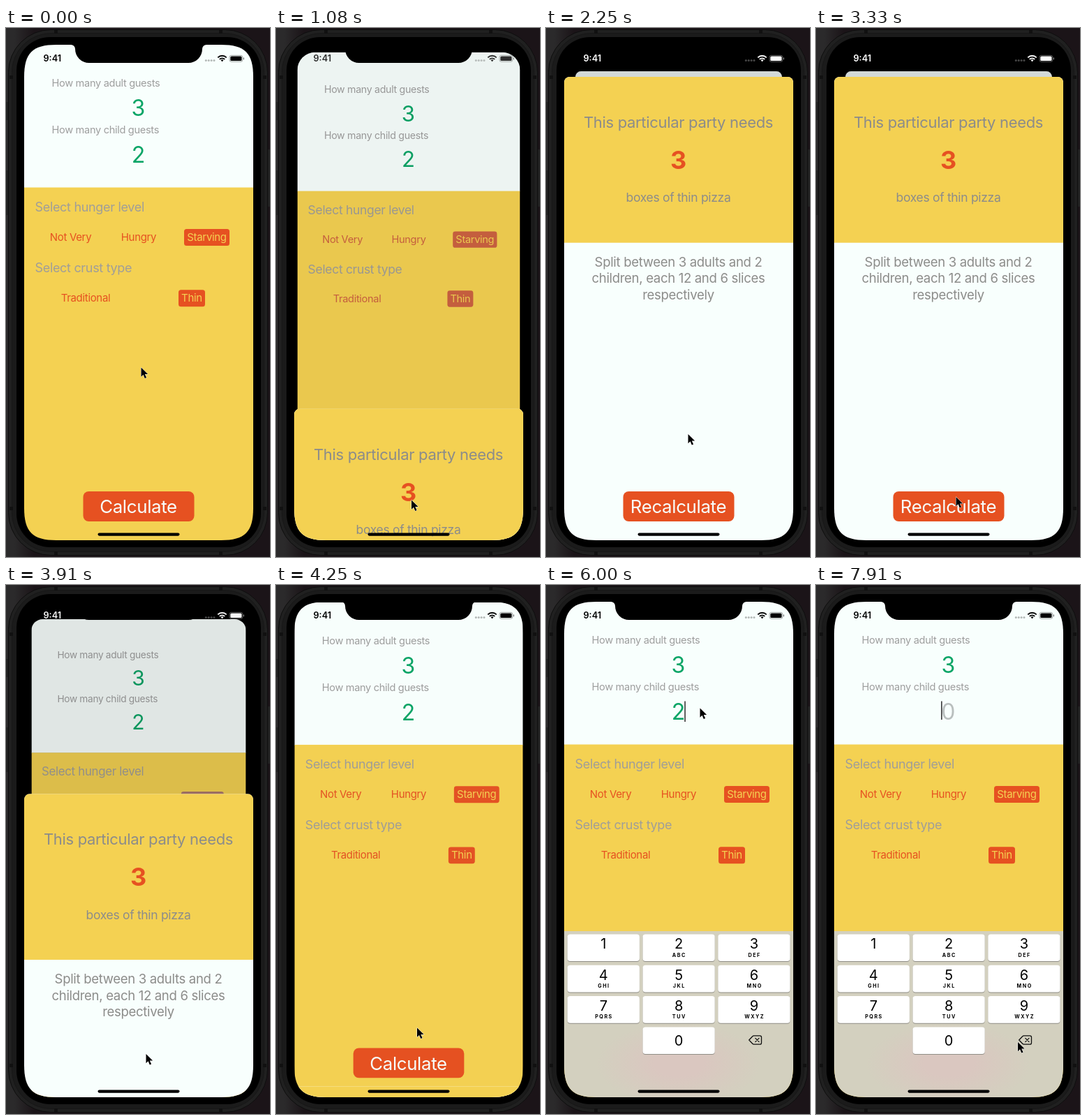
An HTML page for the animation above (8000 ms loop, 378 px wide and 758 px high).

```html
<!DOCTYPE html>
<html lang="en">
<head>
<meta charset="utf-8">
<title>Pizza party calculator</title>
<style>
  html, body { margin: 0; width: 100%; height: 100%; overflow: hidden; }
  body { background: linear-gradient(90deg, #2b2a2b 12px, #1b1418 40px); }
  svg { display: block; width: 378px; height: 758px; font-family: Inter, sans-serif; letter-spacing: -.02em; }
  .mid { text-anchor: middle; }
  .label { font-size: 14.6px; fill: #9e9e9e; }
  .head { font-size: 18px; fill: #a09e98; }
  .count { font-size: 32px; fill: #0aa566; }
  .option { font-size: 15px; fill: var(--tint); }
  .picked { font-size: 15px; fill: #f4d152; }
  .chip { fill: var(--tint); }
  .button { fill: #e65121; }
  .title { font-size: 25.8px; fill: #f8fffd; }
  .info { fill: #8c8c8a; }
  .digit { font-size: 20px; fill: #000; letter-spacing: 0; }
  .letters { font-size: 7.2px; font-weight: 700; fill: #000; letter-spacing: 1.5px; }
</style>
</head>
<body>
<svg viewBox="0 0 378 758">
  <defs>
    <clipPath id="screen">
      <path d="M26 70C26 36 38 24 72 24H308C342 24 354 36 354 70V688C354 722 342 734 308 734H72C38 734 26 722 26 688z"/>
    </clipPath>
    <clipPath id="cardShape"><rect id="cardArea" x="26" y="24" width="328" height="780"/></clipPath>
    <clipPath id="sheetShape"><rect x="26" y="70" width="328" height="700" rx="8"/></clipPath>
    <clipPath id="boardShape"><rect id="boardArea" x="26" width="328" height="238"/></clipPath>
    <radialGradient id="glow">
      <stop offset=".3" stop-color="#dac7c0"/>
      <stop offset="1" stop-color="#dac7c0" stop-opacity="0"/>
    </radialGradient>
  </defs>

  <!-- device -->
  <g fill="#222">
    <rect x="0" y="106" width="5" height="26"/>
    <rect x="0" y="204" width="5" height="64"/>
    <rect x="374" y="174" width="4" height="82"/>
  </g>
  <rect x="3.5" y="2.5" width="371" height="753" rx="61" fill="#202020" stroke="#0e0e0e"/>
  <rect x="8.5" y="7.5" width="361" height="743" rx="56" fill="#1b1b1b" stroke="#171717"/>
  <g fill="#111">
    <rect x="69" y="3" width="5" height="5"/><rect x="305" y="3" width="5" height="5"/>
    <rect x="69" y="750" width="5" height="5"/><rect x="305" y="750" width="5" height="5"/>
    <rect x="5" y="68" width="5" height="5"/><rect x="368" y="68" width="5" height="5"/>
    <rect x="5" y="686" width="5" height="5"/><rect x="368" y="686" width="5" height="5"/>
  </g>
  <rect x="15" y="13" width="350" height="731" rx="48"/>

  <g clip-path="url(#screen)">
    <g id="card"><g clip-path="url(#cardShape)">
      <rect x="26" y="24" width="328" height="205" fill="#f8fffd"/>
      <rect x="26" y="228.5" width="328" height="530" fill="#f4d152"/>
      <text class="label" x="65.5" y="84">How many adult guests</text>
      <text class="count mid" x="189.3" y="126">3</text>
      <text class="label" x="65.5" y="151.3">How many child guests</text>
      <text class="count mid" id="child" x="189.3" y="193.3">2</text>
      <rect id="caret" y="166.5" width="1.7" height="29.5" fill="#444"/>
      <text class="head" x="41.5" y="263">Select hunger level</text>
      <text class="option mid" x="92.5" y="305.2">Not Very</text>
      <text class="option mid" x="190" y="305.2">Hungry</text>
      <rect class="chip" x="255" y="288" width="65" height="24" rx="3.5"/>
      <text class="picked mid" x="287.5" y="305.2">Starving</text>
      <text class="head" x="41.5" y="350.3">Select crust type</text>
      <text class="option mid" x="114" y="392.3">Traditional</text>
      <rect class="chip" x="247" y="375.3" width="38" height="24" rx="3.5"/>
      <text class="picked mid" x="266" y="392.3">Thin</text>
      <rect class="button" x="110.5" y="664" width="159" height="43" rx="8"/>
      <text class="title mid" x="189.5" y="695.3">Calculate</text>
      <rect id="dim" x="26" y="24" width="328" height="735"/>
    </g></g>

    <g id="sheet"><g clip-path="url(#sheetShape)">
      <rect x="26" y="70" width="328" height="700" fill="#f8fffd"/>
      <rect x="26" y="70" width="328" height="237.7" fill="#f4d152"/>
      <g class="info mid">
        <text x="189.5" y="143" font-size="22">This particular party needs</text>
        <text x="189.5" y="249.3" font-size="17.5">boxes of thin pizza</text>
        <g font-size="18.55">
          <text x="189.5" y="341.5">Split between 3 adults and 2</text>
          <text x="189.5" y="365.3">children, each 12 and 6 slices</text>
          <text x="189.5" y="389">respectively</text>
        </g>
      </g>
      <text class="mid" x="189.5" y="202" font-size="36" font-weight="700" fill="#e65121">3</text>
      <rect class="button" x="110.5" y="664" width="159" height="43" rx="8"/>
      <text class="title mid" x="189.5" y="695.3">Recalculate</text>
    </g></g>

    <g clip-path="url(#boardShape)">
      <rect x="26" y="490" width="328" height="250" fill="#d3d0bf"/>
      <ellipse cx="190" cy="686" rx="118" ry="60" fill="url(#glow)"/>
    </g>
    <g id="keys">
      <g id="erase" fill="none" stroke="#111" stroke-width="1.3" stroke-linejoin="round" stroke-linecap="round">
        <path d="M290.7 652l5-5.3q.8-.9 2-.9h8.6q2.2 0 2.2 2.2v8q0 2.2-2.2 2.2h-8.6q-1.2 0-2-.9z"/>
        <path id="cross" d="M299.8 649.4l5.2 5.2m0-5.2l-5.2 5.2"/>
      </g>
    </g>

    <path d="M93 24a6 6 0 0 1 6 6a20 20 0 0 0 20 20h142a20 20 0 0 0 20-20a6 6 0 0 1 6-6z"/>
    <g id="status">
      <text x="53.5" y="48.3" font-size="12.7" font-weight="600" letter-spacing="0">9:41</text>
      <g opacity=".27">
        <circle cx="286.3" cy="46.5" r="1.5"/><circle cx="290.2" cy="46.5" r="1.5"/>
        <circle cx="294.1" cy="46.5" r="1.5"/><circle cx="298" cy="46.5" r="1.5"/>
      </g>
      <g fill="none" stroke="currentColor" stroke-width="1.9">
        <path d="M303.3 42.4A8.6 8.6 0 0 1 315.7 42.4"/>
        <path d="M305.8 44.9A5.2 5.2 0 0 1 313.2 44.9"/>
      </g>
      <path d="M309.5 48.3l-2-2.2a3 3 0 0 1 4 0z"/>
      <rect x="320" y="39.3" width="18.8" height="9" rx="2.6" fill="none" stroke="currentColor" stroke-width=".8" opacity=".45"/>
      <rect x="321.3" y="40.6" width="16.2" height="6.4" rx="1.5"/>
      <rect x="339.8" y="42.3" width="1.2" height="3" rx=".6" opacity=".5"/>
    </g>
    <rect x="131.5" y="723.5" width="117" height="4.2" rx="2.1"/>
    <path id="cursor" d="M0 0v13.2l3-2.9 2.3 5.1 2.3-1-2.3-4.9h4.3z" stroke="#fff" stroke-width="1" paint-order="stroke"/>
  </g>
</svg>

<script>
const LOOP = 8000, SHOW = 1000, HIDE = 3817, TYPE = 4878, ERASE = 7450;
const $ = id => document.getElementById(id);
const clamp = v => Math.max(0, Math.min(1, v));
const set = (id, name, value) => $(id).setAttribute(name, value);
const move = (id, x, y) => set(id, "transform", `translate(${x} ${y})`);

// Critically damped spring from 0 to 1, ms since its start
const spring = ms => {
  const k = Math.max(0, ms) * .013;
  return 1 - (1 + k) * Math.exp(-k);
};

// Pointer stops: time, x, y
const stops = [
  [0, 193.5, 486.5], [150, 193.5, 486.5], [800, 194, 676.5], [1800, 194, 676.5],
  [2200, 203.5, 582], [2500, 203.5, 582], [3100, 200.5, 672], [4150, 200.5, 672],
  [4750, 220.5, 176.5], [6400, 220.5, 176.5], [7150, 289, 655], [LOOP, 289, 655]
];

function pointer(t) {
  const i = stops.findIndex(s => s[0] > t);
  const [a, b] = [stops[i - 1], stops[i]];
  const u = (t - a[0]) / (b[0] - a[0]), e = u * u * (3 - 2 * u);
  return [a[1] + (b[1] - a[1]) * e, a[2] + (b[2] - a[2]) * e];
}

function addKey(digit, letters, col, row) {
  const x = 30.7 + col * 107.8, y = 500.5 + row * 44.3, cx = x + 51.6;
  $("keys").insertAdjacentHTML("beforeend", `
    <rect x="${x}" y="${y + 1}" width="103.2" height="38.6" rx="4" fill="#908e86"/>
    <rect x="${x}" y="${y}" width="103.2" height="38.6" rx="4" fill="#fff"/>
    <text class="digit mid" x="${cx}" y="${y + (digit ? 20.7 : 26.3)}">${digit}</text>
    <text class="letters mid" x="${cx + .7}" y="${y + 32.2}">${letters}</text>`);
}
["", "ABC", "DEF", "GHI", "JKL", "MNO", "PQRS", "TUV", "WXYZ"]
  .forEach((s, i) => addKey(i + 1, s, i % 3, Math.floor(i / 3)));
addKey(0, "", 1, 3);

function draw(t) {
  const p = t < HIDE ? spring(t - SHOW) : 1 - spring(t - HIDE);
  set("card", "transform", `translate(190 ${24 + 38 * p}) scale(${1 - .0975 * p}) translate(-190 -24)`);
  $("card").style.setProperty("--tint", `color-mix(in srgb, #8e8e93 ${p * 100}%, #e65121)`);
  set("cardArea", "rx", 33 - 24 * p);
  set("dim", "opacity", .15 * p);
  move("sheet", 0, 664 * (1 - p));

  const light = 255 * (t < HIDE ? clamp((t - SHOW) / 450) : 1 - clamp((t - 3900) / 300));
  $("status").style.color = $("status").style.fill = `rgb(${light} ${light} ${light})`;

  const drop = 238 * (1 - spring(t - TYPE));
  set("boardArea", "y", 496 + drop);
  move("keys", 0, drop);

  const erased = t >= ERASE, pressed = erased && t < ERASE + 110;
  set("erase", "fill", pressed ? "#111" : "none");
  set("cross", "stroke", pressed ? "#fff" : "#111");
  $("child").textContent = erased ? "0" : "2";
  $("child").style.fill = erased ? "#b9bfbe" : "";
  const blink = (t - (erased ? ERASE : TYPE)) % 1000;
  set("caret", "x", erased ? 179 : 198.2);
  set("caret", "height", erased ? 26.5 : 29.5);
  set("caret", "opacity", t >= TYPE && blink < 500 ? 1 : 0);

  move("cursor", ...pointer(t));
}

const start = performance.now();
function tick() {
  draw((performance.now() - start) % LOOP);
  requestAnimationFrame(tick);
}
tick();
</script>
</body>
</html>
```
